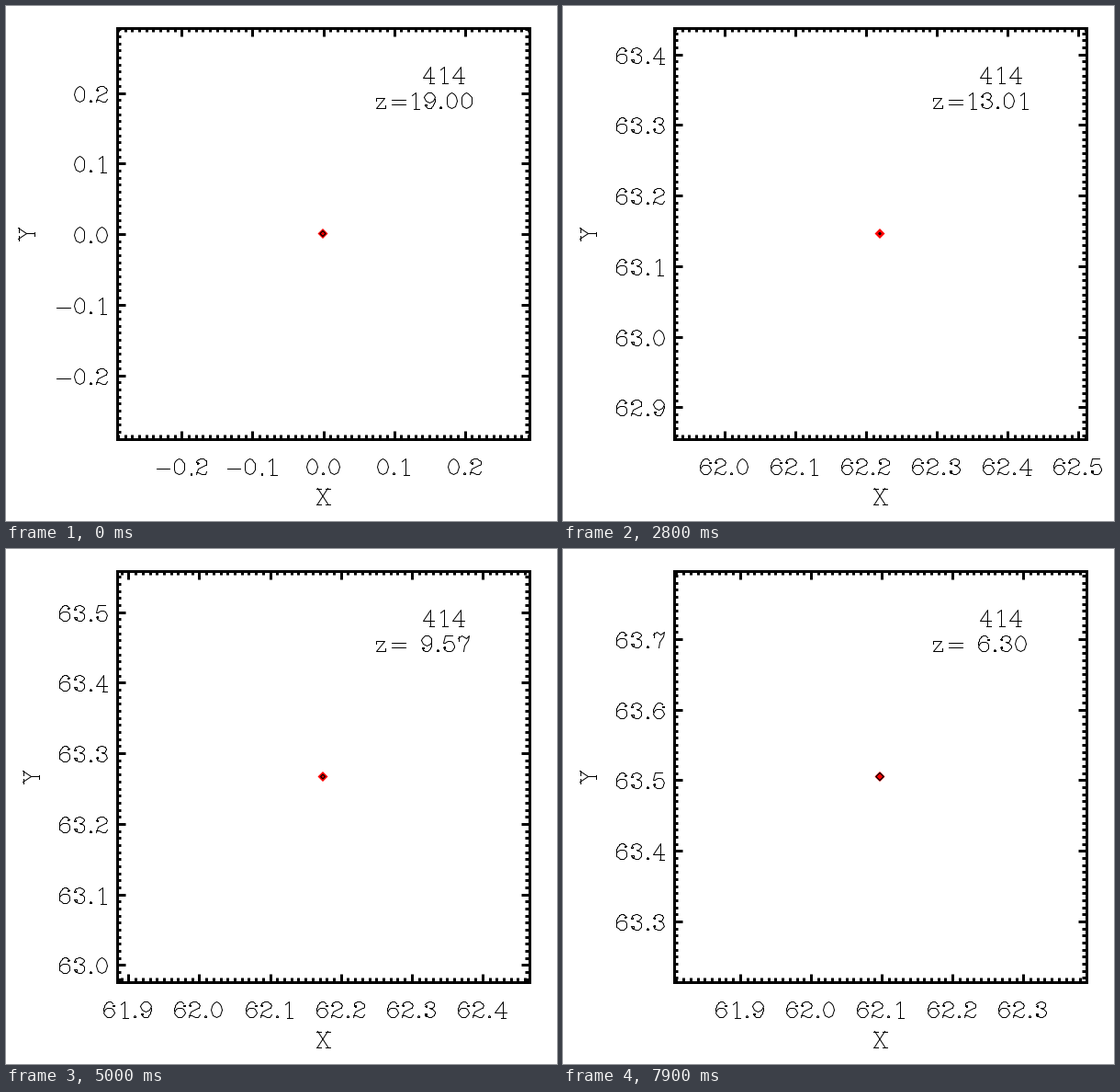
A matplotlib script that plays this animation: 600 by 560 pixels, repeating every 8000 ms.

```python
import math
import numpy as np
import matplotlib.pyplot as plt
from matplotlib.animation import FuncAnimation
from matplotlib.collections import LineCollection
from matplotlib.patches import Polygon

W, H, DPI = 600, 560, 100
FRAMES, INTERVAL = 80, 100
LEFT, RIGHT, TOP, BOTTOM = 120, 569, 23, 470
CX, CY = (LEFT + RIGHT) / 2, (TOP + BOTTOM) / 2 + 0.5
SX, SY = 771.0, 767.5          # pixels per data unit
UNIT = 0.805                   # pixels per glyph unit
PX = 72 / DPI


# ---- stroke font: baseline at 0, caps at 21 ----------------------------
def arc(x, y, rx, ry, start=0, end=360):
    t = np.radians(np.linspace(start, end, 17))
    return list(zip(x + rx * np.cos(t), y + ry * np.sin(t)))


def dot(x, y):
    return arc(x, y, 1, 1)


def bar(x, y, half=3):
    return [(x - half, y), (x + half, y)]


def turned(strokes):
    return [[(20 - x, 21 - y) for x, y in s] for s in strokes]


SIX = [arc(10, 6.5, 7, 6.5), arc(10.5, 10, 7.5, 11, 185, 50), dot(15, 17)]

DIGITS = [
    [arc(10, 10.5, 7, 10.5)],
    [[(6, 17), (11, 21), (11, 0)], bar(11, 0, 4)],
    [dot(4, 16), arc(10, 15.5, 7, 5.5, 175, -40) + [(5, 7), (3, 0)],
     [(3, 2), (6, 2), (11, 0), (15, 0), (17, 4)]],
    [dot(4, 16), arc(10, 16.5, 6, 4.5, 170, -90),
     arc(10, 6, 7, 6, 90, -165), dot(4, 5)],
    [[(13, 0), (13, 21), (2, 6), (18, 6)], bar(13, 0)],
    [[(15, 21), (5, 21), (3, 11)] + arc(10, 7, 7, 7, 140, -165), dot(4, 5)],
    SIX,
    [[(3, 15), (3, 21)],
     [(3, 17), (7, 21), (13, 18), (17, 21), (16, 15), (11, 8), (10, 0)]],
    [arc(10, 16.5, 6, 4.5), arc(10, 6, 7, 6)],
    turned(SIX),
]

# character: (advance, strokes)
GLYPHS = {str(n): (20, strokes) for n, strokes in enumerate(DIGITS)}
GLYPHS |= {
    " ": (16, []),
    ".": (10, [dot(5, 1)]),
    "-": (26, [bar(13, 9, 9)]),
    "=": (26, [bar(13, 12, 9), bar(13, 6, 9)]),
    "z": (18, [[(14, 4), (14, 0), (2, 0), (13, 14), (2, 14), (2, 10)]]),
    "X": (20, [[(3, 21), (17, 0)], [(17, 21), (3, 0)]]
          + [bar(x, y) for x in (4, 16) for y in (0, 21)]),
    "Y": (20, [[(3, 21), (10, 10), (10, 0)], [(17, 21), (10, 10)],
               bar(4, 21), bar(16, 21), bar(10, 0)]),
}


def text(s, x, y, align=0.0, upright=True):
    """Strokes of s on baseline y; align 0 is left, 0.5 centre, 1 right."""
    pen = -align * sum(GLYPHS[c][0] for c in s)
    out = []
    for c in s:
        advance, strokes = GLYPHS[c]
        for stroke in strokes:
            p = np.array(stroke, float)
            u, v = (p[:, 0] + pen) * UNIT, p[:, 1] * UNIT
            points = np.column_stack((x + u, y - v) if upright else (x - v, y - u))
            out.append(np.floor(points + 0.5))
        pen += advance
    return out


# ---- motion: key points (frame, redshift, x, y) on smooth paths --------
STEP, Z, X, Y = np.array([
    (0, 19.00, 62.252, 63.000),
    (11, 16.39, 62.242, 63.057),
    (28, 13.01, 62.219, 63.146),
    (40, 11.00, 62.199, 63.2085),
    (60, 8.31, 62.1486, 63.3325),
    (79, 6.30, 62.098, 63.5045),
]).T
path_x, path_y = (np.poly1d(np.polyfit(STEP, v, 4)) for v in (X, Y))


def redshift(i):
    return math.expm1(np.interp(i, STEP, np.log1p(Z)))


def center(i):
    # the track has no position yet at the very start
    return (path_x(i), path_y(i)) if i else (0.0, 0.0)


def ring_size(i):
    return 4.2 * (i / (FRAMES - 1)) ** 1.2 if i else 3.0


def axis_ticks(mid, origin, scale, low, high):
    """Yield pixel position, tick length and label for each hundredth."""
    first = math.ceil((mid + (low - origin) / scale) * 100)
    last = math.floor((mid + (high - origin) / scale) * 100)
    for k in range(first, last + 1):
        major = k % 10 == 0
        pos = math.floor(origin + (k / 100 - mid) * scale + 0.5)
        yield pos, 9 if major else 4.5, f"{k / 100:.1f}" if major else ""


# ---- stage -------------------------------------------------------------
fig = plt.figure(figsize=(W / DPI, H / DPI), dpi=DPI, facecolor="white")
ax = fig.add_axes([0, 0, 1, 1])
ax.set_xlim(-0.5, W - 0.5)
ax.set_ylim(H - 0.5, -0.5)
ax.axis("off")


def diamond(r):
    return [(CX - r, CY), (CX, CY - r), (CX + r, CY), (CX, CY + r)]


ax.add_patch(Polygon(diamond(5.5), facecolor="red", edgecolor="none"))
ring = ax.add_patch(Polygon(diamond(3), fill=False, edgecolor="black",
                            linewidth=1.2 * PX, joinstyle="miter"))
ax.add_patch(Polygon([(LEFT, TOP), (RIGHT, TOP), (RIGHT, BOTTOM), (LEFT, BOTTOM)],
                     fill=False, edgecolor="black", linewidth=3 * PX,
                     joinstyle="miter"))
ticks = ax.add_collection(LineCollection([], colors="black", linewidths=3 * PX,
                                         capstyle="butt"))
labels = ax.add_collection(LineCollection([], colors="black", linewidths=PX,
                                          capstyle="projecting"))


def draw(i):
    x0, y0 = center(i)
    lines = []
    strokes = text("414", 452, 83) + text(f"z={redshift(i):5.2f}", 401.5, 111)
    strokes += text("X", CX, 541, 0.5)
    strokes += text("Y", 35 if i else 30, CY, 0.5, upright=False)

    for x, size, label in axis_ticks(x0, CX, SX, LEFT, RIGHT):
        lines += [[(x, BOTTOM), (x, BOTTOM - size)], [(x, TOP), (x, TOP + size)]]
        strokes += text(label, x, 509, 0.5)

    for y, size, label in axis_ticks(y0, CY, -SY, BOTTOM, TOP):
        lines += [[(LEFT, y), (LEFT + size, y)], [(RIGHT, y), (RIGHT - size, y)]]
        strokes += text(label, 112, y + 10, 1)

    ticks.set_segments(lines)
    labels.set_segments(strokes)
    r = ring_size(i)
    ring.set_xy(diamond(r))
    ring.set_visible(r > 0.5)
    return ticks, labels, ring


anim = FuncAnimation(fig, draw, frames=FRAMES, interval=INTERVAL,
                     repeat=True, repeat_delay=0, blit=False)
plt.show()
```
